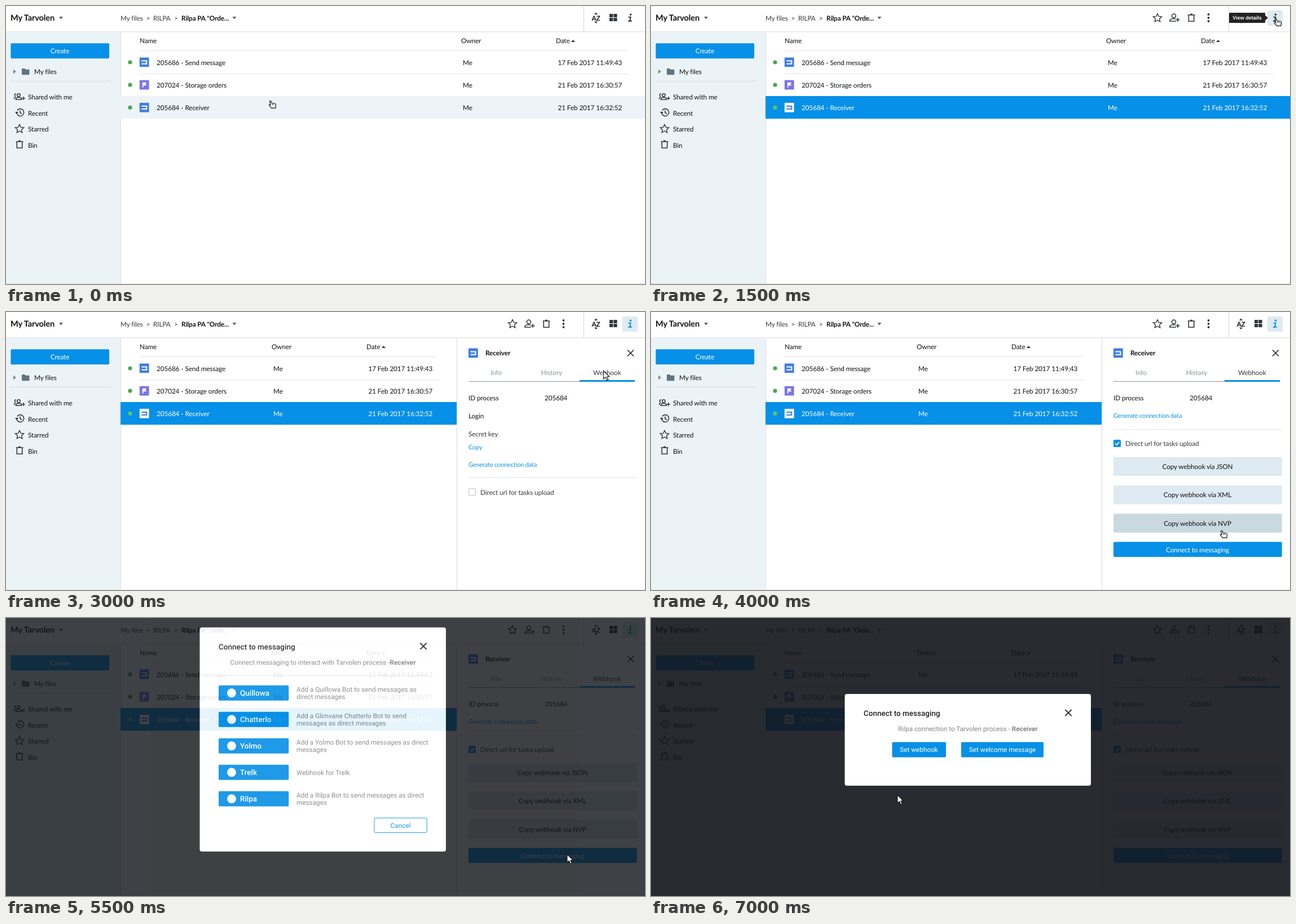
An HTML page that plays this animation: 1133x494 px, repeating every 8000 ms.

```html
<!DOCTYPE html>
<html lang="en">
<head>
<meta charset="utf-8">
<title>Connecting a process to a chat service</title>
<style>
html, body { margin: 0; width: 100%; height: 100%; overflow: hidden; background: #fff; }
svg { display: block; text-rendering: geometricPrecision; }
text { font: 11.8px Lato, sans-serif; letter-spacing: -.01em; fill: #101214; white-space: pre; }
.bold { font-weight: 700; }
.brand { font-size: 14.6px; font-weight: 700; }
.crumb { fill: #353a3f; }
.white { fill: #fff; }
.muted { fill: #8d9499; }
.link { fill: #0690e7; font-size: 10.9px; }
.tip { font: 700 9px "Liberation Sans", Arial, sans-serif; letter-spacing: 0; fill: #fff; }
.title, .label, .desc, .action { font-family: Roboto, sans-serif; letter-spacing: 0; }
.title { font-size: 13.5px; font-weight: 500; fill: #222; }
.label { font-size: 13.45px; font-weight: 500; fill: #fff; }
.desc { font-size: 11.75px; fill: #858585; }
.action { font-size: 11.8px; }
</style>
</head>
<body>
<svg id="stage" width="1133" height="494" viewBox="0 0 1133 494"></svg>
<script>
const BLUE = '#0690e7', INK = '#30363b', LINE = '#e1e6e9', PALE = '#deeaf1';
const STEP = 500, LOOP = 8000;

const text = (s, x, y, cls = '', anchor = 'start') =>
  `<text x="${x}" y="${y}" class="${cls}" text-anchor="${anchor}">${s}</text>`;
const center = (s, x, y, cls) => text(s, x, y, cls, 'middle');
const rect = (x, y, w, h, fill, r = 0, extra = '') =>
  `<rect x="${x}" y="${y}" width="${w}" height="${h}" rx="${r}" fill="${fill}" ${extra}/>`;
const circle = (x, y, r, fill, extra = '') =>
  `<circle cx="${x}" cy="${y}" r="${r}" fill="${fill}" ${extra}/>`;
const fill = (d, color) => `<path d="${d}" fill="${color}"/>`;
const stroke = (d, color = INK, w = 1.6) =>
  `<path d="${d}" fill="none" stroke="${color}" stroke-width="${w}"/>`;
const at = (x, y, body) => `<g transform="translate(${x} ${y})">${body}</g>`;
const hline = (x1, x2, y, color = LINE) => rect(x1, y, x2 - x1, 1, color);
const caret = (x, y) => fill(`M${x - 3.5} ${y - 2}h7l-3.5 4.5z`, '#596269');
const cross = (x, y, r, w) =>
  stroke(`M${x - r} ${y - r}l${2 * r} ${2 * r}m0 ${-2 * r}l${-2 * r} ${2 * r}`, '#222', w);

function star(x, y, size) {
  const points = Array.from({ length: 10 }, (_, i) => {
    const a = i * Math.PI / 5, r = i % 2 ? size * .47 : size;
    return `${(Math.sin(a) * r).toFixed(2)} ${(-Math.cos(a) * r).toFixed(2)}`;
  });
  return at(x, y, stroke(`M${points.join('L')}z`, INK, 1.4));
}
const trash = (x, y) => at(x, y, stroke('M-6.5-5h13M-2-6.5h4M-4.7-5v11.3h9.4v-11.3'));
const person = (x, y) => at(x, y,
  circle(-1, -3.5, 3.5, 'none', `stroke="${INK}" stroke-width="1.6"`) +
  stroke('M3 6h-11v-1.5q1-3 7-3q2 0 3 .4M6 0v7M2.5 3.5h7'));
const people = (x, y) => at(x, y,
  circle(-1.5, -2.5, 2.7, 'none', `stroke="${INK}" stroke-width="1.5"`) +
  stroke('M-6.5 5.2v-1.5q1-2.4 5-2.4t5 2.4v1.5zM-6-5q-3 0-2.5 2.5t2 2M-9.3 4.2v-2l2-1.3M7 0v6M4.2 3h5.6', INK, 1.5));
const clock = (x, y) => at(x, y, stroke('M-6 1a6.4 6.4 0 1 0 1-4.5M0-3.5v4l3 2') + fill('M-9-1h6l-3 4z', INK));
const infoGlyph = color => circle(1107.5, 15.2, 1.8, color) +
  stroke('M1103.5 19.8h4l-1.3 6.6M1103 26.8h6.8', color, 2);

function processIcon(x, y, inverted) {
  return at(x, y, rect(0, 0, 16.8, 16.8, inverted ? '#fff' : '#3f7de8', 1) +
    stroke('M3.5 6h9v5.2h-9', inverted ? '#3f7de8' : '#fff', 2));
}
const storageIcon = (x, y) => at(x, y, rect(0, 0, 16.8, 16.8, '#7a74e6', 1) +
  fill('M5 13v-9h7.5l-2 2.7 2 2.8h-5.7v3.5z', '#fff'));

const cursors = {
  arrow: '<path d="M0 0v14.5l3.4-3.1 2.4 5.4 2.5-1.1-2.4-5.2h4.6z" fill="#fff" stroke="#111" stroke-width="1.1"/>',
  hand: '<path d="M1.5 1.5q1.6-1.8 2.8.3l.5 2.7 5.4.5q2.2.4 2.3 2.3l-.6 6h-7.4l-4-5q-.5-1.7 1.6-1.2l1 .6z" fill="#fff" stroke="#111" stroke-width="1.2"/><path d="M6.5 5.5v2.5M9 5.8v2.2" stroke="#111" fill="none"/>'
};

function sidebar() {
  const items = ['Shared with me', 'Recent', 'Starred', 'Bin'];
  return rect(0, 46, 203, 448, '#ebf3f7') + rect(203, 46, 1, 448, '#d9e1e6') +
    rect(8.4, 66.3, 174.7, 26.9, BLUE, 1.7) + center('Create', 95.5, 84, 'white') +
    fill('M13 112.5l5 4-5 4z', '#7d8a93') +
    fill('M28 112q0-1 1-1h4l1.5 1.7h6q1 0 1 1v7.5q0 1-1 1h-11.5q-1 0-1-1z', '#5f7583') +
    text('My files', 50, 121) + hline(8, 186, 133, '#cfdae0') +
    items.map((s, i) => text(s, 39, 166 + i * 28.5)).join('') +
    people(24, 161) + clock(25, 189) + star(24, 218.5, 8) + trash(24, 246);
}

function header(s) {
  let out = rect(0, 0, 1133, 46, '#fff') + hline(0, 1133, 45, '#e3e6e8') + hline(0, 1133, 46, '#eef1f3') +
    text('My Tarvolen', 8, 26, 'brand') + caret(97.5, 21) +
    text('My files', 203, 26, 'crumb') + text('&gt;', 248.5, 26, 'crumb') +
    text('RILPA', 261, 26, 'crumb') + text('&gt;', 298, 26, 'crumb') +
    text('Rilpa PA "Orde...', 311, 26, 'bold') + caret(405, 21) +
    rect(1024, 0, 1, 46, '#d5dadd');
  if (s.selected) {
    out += star(898, 21.5, 8) + person(928, 21) + trash(958, 21) +
      [15, 21, 27].map(y => circle(988.5, y, 1.9, INK)).join('');
  }
  out += center('AZ', 1046, 25.5, 'bold') +
    fill('M1043 15l3-3.5 3 3.5zM1043 27.5l3 3.5 3-3.5z', INK);
  for (const x of [1070, 1077.3]) for (const y of [14, 21]) out += rect(x, y, 6.3, 6, INK, .6);
  if (s.infoHover || s.panel) out += rect(1093, 8, 27, 27, PALE, 2);
  out += infoGlyph(s.panel ? BLUE : INK);
  if (s.tooltip) {
    out += rect(1025, 12, 64, 18, '#222', 1) + fill('M1089 16.5l5 4.5-5 4.5z', '#222') +
      center('View details', 1057, 24, 'tip');
  }
  return out;
}

function fileList(s) {
  const shift = s.panel ? -336 : 0;
  const rows = [
    ['205686 - Send message', '17 Feb 2017 11:49:43'],
    ['207024 - Storage orders', '21 Feb 2017 16:30:57'],
    ['205684 - Receiver', '21 Feb 2017 16:32:52']
  ];
  const dateX = 975 + shift;
  let out = text('Name', 237, 66) + text('Owner', 807 + shift, 66) + text('Date', dateX, 66) +
    fill(`M${dateX + 27} 64h7l-3.5-4z`, INK) +
    hline(237, 1101 + shift, 79) + hline(237, 1104 + shift, 120) +
    rect(203, 160, (s.panel ? 799 : 1133) - 203, 40.3, s.selected ? BLUE : '#edf3f7');
  rows.forEach(([name, date], i) => {
    const y = 100 + i * 40.2, chosen = i === 2 && s.selected, cls = chosen ? 'white' : '';
    out += circle(220, y, 3.6, chosen ? '#5fc667' : '#4aa850') +
      (i === 1 ? storageIcon(236.8, y - 8.5) : processIcon(236.8, y - 8.5, chosen)) +
      text(name, 267, y + 4.5, cls) + text('Me', 810 + shift, y + 4.5, cls) +
      text(date, 978.5 + shift, y + 4.5, cls);
  });
  return out;
}

function panel(s) {
  let out = rect(799, 47, 334, 447, '#fff') + rect(799, 47, 1, 447, '#d5dde2') +
    processIcon(820, 64.5) + text('Receiver', 850, 77, 'bold') + cross(1107.5, 73, 5.5, 1.6) +
    hline(820, 1115, 123, '#8e9aa1');
  ['Info', 'History', 'Webhook'].forEach((tab, i) => {
    const active = i === (s.webhook ? 2 : 0);
    if (active) out += rect(820 + i * 98.4, 121, 98.4, 3, BLUE);
    out += center(tab, 869 + i * 98.4, 112, active ? 'crumb' : 'muted');
  });
  out += text('ID process', 820, 157) + text('205684', 955, 157);
  if (!s.webhook) return out;

  const top = s.direct ? -86.5 : 0;
  if (!s.direct) {
    out += text('Login', 820, 189) + text('Secret key', 820, 221, 'crumb') + text('Copy', 820, 243.5, 'link');
  }
  out += text('Generate connection data', 820, 274.5 + top, 'link') + hline(820, 1119, Math.round(294 + top)) +
    text('Direct url for tasks upload', 841, 324.5 + top, 'crumb');
  if (!s.direct) return out + rect(820.5, 313.5, 12, 12, '#fff', 1.5, 'stroke="#b4bec4"');

  out += rect(820, 227, 13, 13, BLUE, 1.5) + stroke('M823 233.5l2.7 2.7 4.6-5', '#fff', 1.7);
  ['JSON', 'XML', 'NVP'].forEach((format, i) => {
    const y = 257.7 + i * 50.4;
    out += rect(820, y, 298.7, 33.6, s.nvpHover && i === 2 ? '#cad9e0' : PALE, 2) +
      center('Copy webhook via ' + format, 969, y + 21);
  });
  return out + rect(820, 408.4, 298.7, 26.9, s.connect || BLUE, 2) +
    center('Connect to messaging', 969, 426.5, 'white');
}

const dialog = (y, h) => rect(343.5, y, 436.5, h, '#fff', 4) +
  text('Connect to messaging', 377, y + 39, 'title') + cross(740, y + 33.5, 5.7, 1.8);
const subtitle = (s, y) => center(s + '<tspan class="bold">Receiver</tspan>', 562, y, 'desc');

function serviceDialog(hover) {
  const services = [
    ['Quillowa', 'Add a Quillowa Bot to send messages as', 'direct messages'],
    ['Chatterlo', 'Add a Glimvane Chatterlo Bot to send', 'messages as direct messages'],
    ['Yolmo', 'Add a Yolmo Bot to send messages as direct', 'messages'],
    ['Trelk', 'Webhook for Trelk'],
    ['Rilpa', 'Add a Rilpa Bot to send messages as direct', 'messages']
  ];
  let out = dialog(16.7, 398.3) + subtitle('Connect messaging to interact with Tarvolen process -', 82.7) +
    hline(377, 746, 102, '#e6e6e6');
  services.forEach(([name, ...lines], i) => {
    const y = 119.8 + i * 47;
    out += rect(377, y, 124.3, 26.9, hover && i === 4 ? '#0066bf' : BLUE, 1.7) +
      circle(400, y + 13.5, 8, '#fff') + text(name, 415, y + 18, 'label') +
      lines.map((line, n) => text(line, 515, y + (lines.length > 1 ? 11 : 18) + n * 13.5, 'desc')).join('');
  });
  return out + rect(653, 355.3, 93.2, 26, '#fff', 1.7, `stroke="${BLUE}"`) +
    center(`<tspan fill="${BLUE}">Cancel</tspan>`, 699.5, 372.5, 'action');
}

function webhookDialog() {
  return dialog(135, 163) + subtitle('Rilpa connection to Tarvolen process - ', 201.3) +
    rect(427.5, 220.5, 95.5, 26.9, BLUE, 1.7) + center('Set webhook', 475, 238.3, 'action white') +
    rect(550, 220.5, 146, 26.9, BLUE, 1.7) + center('Set welcome message', 623, 238.3, 'action white');
}

// Each entry adds to the state reached before it.
const timeline = [
  { cursor: ['hand', 466, 168] },
  { selected: true },
  { cursor: ['arrow', 1109, 40.5] },
  { cursor: ['hand', 1105, 22], infoHover: true, tooltip: true },
  { cursor: ['arrow', 1075, 146], panel: true },
  { cursor: ['arrow', 1059.5, 104.5], tooltip: false },
  { webhook: true },
  { cursor: ['arrow', 1054, 138.5], direct: true },
  { cursor: ['hand', 1009, 388], nvpHover: true },
  { cursor: ['hand', 990, 420], nvpHover: false, connect: '#067acf' },
  { connect: '#0066bf' },
  { cursor: ['arrow', 995, 420], connect: BLUE, dialog: serviceDialog, opacity: .9 },
  { cursor: ['hand', 433, 315], opacity: 1 },
  { serviceHover: true },
  { cursor: ['arrow', 437, 314.5], dialog: webhookDialog },
  {}
];
let state = {};
const scenes = timeline.map(change => {
  const s = state = { ...state, ...change };
  const [kind, x, y] = s.cursor;
  return rect(0, 0, 1133, 494, '#fff') + sidebar() + fileList(s) + header(s) +
    (s.panel ? panel(s) : '') + hline(0, 1133, 493, '#dfe4e7') +
    (s.dialog ? `<g opacity="${s.opacity}">${rect(0, 0, 1133, 494, 'rgba(18,21,26,.9)')}${s.dialog(s.serviceHover)}</g>` : '') +
    at(x, y, cursors[kind]);
});

const stage = document.getElementById('stage');
let shown = -1;
function draw() {
  const index = Math.floor(performance.now() % LOOP / STEP);
  if (index !== shown) stage.innerHTML = scenes[shown = index];
  requestAnimationFrame(draw);
}
draw();
</script>
</body>
</html>
```
